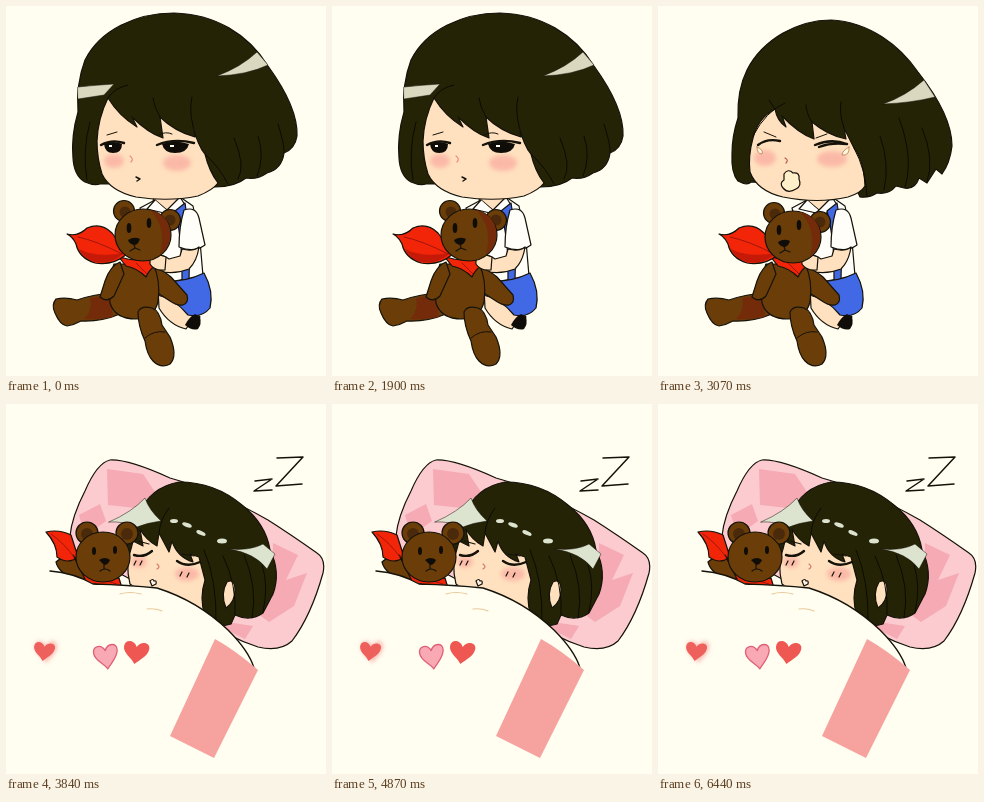
An HTML page for the animation above (6470 ms loop, 320x370 px).

```html
<!DOCTYPE html>
<html lang="en">
<head>
<meta charset="utf-8">
<title>Sleepy girl and teddy</title>
<style>
html, body { margin: 0; width: 100%; height: 100%; overflow: hidden; background: #fffef1; }
svg { display: block; width: 320px; height: 370px; }
g[id] { display: none; }
g[id].on { display: inline; }
#scene { stroke: #15120a; stroke-width: 1.2; stroke-linejoin: round; stroke-linecap: round; fill: none; }
.hair { fill: #252306; }
.strand { stroke: #0c0b02; stroke-width: 1; }
.skin { fill: #ffe1bf; }
.shine { fill: #dad8bf; stroke-width: .5; }
.pale { fill: #dce3cf; }
.blush { fill: #f9a99d; opacity: .7; stroke: none; }
.white { fill: #fffef8; }
.blue { fill: #4169e6; }
.bear { fill: #6b3e09; }
.dark { fill: #4b2a0b; stroke: none; }
.rust { fill: #742b0a; stroke: none; }
.red { fill: #f32508; }
.shade { fill: #c61a08; stroke: none; }
.fold { stroke: #9e160b; stroke-width: 1; }
.ink { fill: #100d08; stroke: none; }
.lid { stroke-width: 2.4; }
.tear { fill: #fff6dc; stroke: #b77c50; stroke-width: .8; }
.fill { stroke: none; }
</style>
</head>
<body>
<svg viewBox="0 0 320 370">
<defs>
  <path id="heartShape" d="M0 12C-3 6 -11 3 -11 -4C-11 -11 -3 -12 0 -5C3 -12 12 -11 11 -4C10 3 5 6 0 12Z"/>
  <filter id="soft" x="-50%" y="-50%" width="200%" height="200%"><feGaussianBlur stdDeviation="2"/></filter>
</defs>
<g id="scene" class="on">

  <g id="body">
    <!-- girl -->
    <path class="skin" d="M147 188L176 188L174 207L148 207Z"/>
    <path class="white" d="M134 202L149 194L162 205L174 191L187 200L194 235L197 270L168 275L150 262Z"/>
    <path class="white" d="M149 194L141 203L158 207L174 191L179 199L166 209"/>
    <path class="blue" d="M169 205L179 197Q185 230 183 274L176 274Q177 235 169 205Z"/>
    <path class="skin" d="M152 282L183 300L194 311Q184 316 180 323Q163 319 153 302Z"/>
    <path class="blue" d="M151 276Q178 277 198 267Q208 285 204 302Q196 312 182 309Q168 292 151 289Z"/>
    <path class="ink" d="M179 319Q183 311 189 308L194 311Q196 318 192 323Q186 325 179 319Z"/>
    <path class="white" d="M178 204Q190 200 193 212L199 239Q188 247 173 241Q173 221 178 204Z"/>
    <path class="skin" d="M176 243Q187 246 193 241Q191 255 183 263Q168 269 152 265L144 258L148 249Q157 248 163 253L174 250Z"/>
    <!-- bear -->
    <path class="bear" d="M149 262Q157 264 165 271L181 289Q183 297 177 299Q171 300 164 295L147 284Z"/>
    <path class="bear" d="M108 287Q88 288 71 294Q60 291 50 293Q45 299 49 307Q54 319 61 320Q68 319 75 315Q95 316 114 308Z"/>
    <path class="rust" d="M84 292L104 289L107 311Q92 314 78 313Q87 304 84 292Z"/>
    <path class="bear" d="M108 258Q101 274 104 297Q109 313 130 313Q148 312 152 296Q155 274 147 258Z"/>
    <path class="bear" d="M132 306Q135 299 146 302Q154 305 156 319L164 331Q172 350 164 358Q155 363 147 355Q141 349 139 335Q132 320 132 306Z"/>
    <path d="M139 332Q148 324 159 326" stroke-width="1"/>
    <path class="bear" d="M114 256Q104 260 99 275L94 291Q101 297 108 290L118 268Z"/>
    <path class="red" d="M112 250Q131 258 153 250L152 258Q144 262 140 271Q131 262 120 260Z"/>
    <path class="red" d="M61 228Q72 231 81 222Q95 216 106 227L121 248Q107 260 89 257Q73 252 70 238Q67 231 61 228Z"/>
    <path class="shade" d="M73 243Q90 252 118 247Q106 259 89 256Q77 252 73 243Z"/>
    <path class="fold" d="M72 231Q91 235 116 248M130 257L141 268"/>
    <path class="skin" d="M144 258Q143 249 151 248L160 251L159 264Q148 265 144 258Z"/>
    <g class="bearHead">
      <circle class="bear" cx="118" cy="205" r="10.5"/>
      <circle class="bear" cx="164" cy="214" r="10.5"/>
      <circle class="dark" cx="119" cy="206" r="5.5"/>
      <circle class="dark" cx="164" cy="214" r="5.5"/>
      <ellipse class="bear" cx="137" cy="229" rx="28" ry="26"/>
      <path class="rust" d="M144 204Q167 210 164 234Q161 244 154 248Q161 221 144 204Z"/>
      <ellipse class="ink" cx="123" cy="222" rx="2.3" ry="5"/>
      <ellipse class="ink" cx="143" cy="217" rx="2.3" ry="5"/>
      <path class="ink" d="M122 234Q128 230 134 233Q132 239 128 239Q123 238 122 234Z"/>
      <path d="M128 238L129 242L124 245M129 242L134 244"/>
    </g>
  </g>

  <g id="drowsy">
    <path class="hair" d="M94 178Q88 180 79 176Q68 170 67 152Q65 130 72 106Q70 78 79 54C94 24 130 7 168 7C209 8 242 28 262 60C278 82 292 108 291 130Q289 143 278 147Q276 163 261 167Q251 174 240 172Q229 181 209 181L196 178Z"/>
    <path class="skin" d="M102 92Q92 112 91 135Q91 152 96 168Q104 185 130 191Q163 196 192 190Q207 184 212 177Q203 165 199 148Q192 140 187 120L189 131Q168 125 154 111L157 132Q142 127 126 111L131 121Q113 110 102 92Z"/>
    <path class="shine" d="M72 81Q91 79 108 78L98 89L72 93Z"/>
    <path class="shine" d="M211 70Q235 61 251 46L262 59Q241 69 211 70Z"/>
    <path class="strand" d="M102 92Q108 82 122 79M154 111Q148 101 147 92M187 120Q183 104 186 91M199 148Q214 162 222 178M228 132Q240 160 232 173M252 130Q259 150 251 170M272 118Q279 140 278 147M84 116Q76 145 81 174"/>
    <path d="M101 129L111 126M152 129Q160 125 166 128" stroke-width="1"/>
    <ellipse class="blush" cx="108" cy="155" rx="10" ry="7" filter="url(#soft)"/>
    <ellipse class="blush" cx="171" cy="157" rx="14" ry="8" filter="url(#soft)"/>
    <path class="ink" d="M98 138Q108 134 116 138Q116 147 107 147Q99 147 98 138ZM156 138Q168 133 183 138Q181 147 169 147Q158 147 156 138Z"/>
    <path class="lid" d="M95 139Q106 133 118 137M151 139Q168 132 188 137"/>
    <path class="white fill" d="M103 139h3v2h-3ZM164 139h4v2h-4Z"/>
    <path d="M124 150Q128 153 125 156" stroke="#ef8878"/>
    <path d="M130 171L134 173L131 175" stroke-width="1.4"/>
  </g>

  <g id="yawn">
    <path class="hair" d="M93 176Q89 180 80 175Q73 167 74 148Q74 130 80 112Q79 84 89 64C105 33 140 14 173 14C212 16 242 40 260 66C279 90 294 116 294 140Q292 157 284 168L278 163L269 177L261 172Q257 184 246 182L238 180Q231 189 219 187Q212 192 202 191L197 180Z"/>
    <path class="skin" d="M117 103Q100 112 95 132Q90 150 92 166Q99 185 125 191Q160 198 190 191Q203 187 207 180Q206 155 196 142L186 122L188 133Q169 129 154 116L156 133Q140 127 124 110L128 121Q119 115 117 103Z"/>
    <path class="strand" d="M117 103L111 94M95 130Q108 105 127 97M154 116Q148 107 148 99M186 122Q181 108 183 96M196 142Q208 164 209 190M222 130Q232 157 226 184M241 112Q256 152 247 181M264 122Q277 153 269 176"/>
  </g>
  <path id="heldShine" class="shine" d="M225 98Q248 90 266 74L277 91Q253 97 225 98Z"/>
  <path id="wideShine" class="shine" d="M84 89Q95 89 109 86L95 97L82 97ZM238 83Q253 77 262 65L267 77Q256 82 238 83Z"/>

  <g id="yawnFace">
    <ellipse class="blush" cx="107" cy="152" rx="11" ry="8" filter="url(#soft)"/>
    <ellipse class="blush" cx="174" cy="153" rx="15" ry="8" filter="url(#soft)"/>
    <path d="M106 126L118 131M158 132L169 128" stroke-width="1"/>
    <path class="lid" d="M100 139Q109 132 122 135M157 139Q173 132 189 138M161 141Q174 136 189 138"/>
    <path class="tear" d="M99 141Q106 144 104 148Q99 148 99 141ZM191 141Q192 150 184 149Q184 145 191 141Z"/>
    <path d="M127 152Q131 154 128 157" stroke="#b55f4c"/>
    <path d="M126 168Q130 162 135 167Q142 166 141 173Q144 180 138 183Q130 188 125 182Q121 177 126 174Z" fill="#fff0ca"/>
  </g>

  <g id="sleep">
    <path d="M64 132Q66 112 79 87Q91 59 104 56Q122 55 164 74Q211 87 262 116Q284 130 311 149Q320 155 317 169Q305 212 286 237Q274 248 252 243Q221 233 195 213L68 145Z" fill="#fbcbd0"/>
    <path class="fill" fill="#f6aab3" d="M101 65L137 70L149 88L130 104L102 101ZM73 111L94 100L100 117L79 132ZM267 139L292 151L280 176L301 169L288 202L263 218L248 207L266 195ZM221 218L247 222L239 235L213 222Z"/>
    <path class="hair" d="M123 151Q117 133 132 111Q144 83 173 78Q209 78 236 101Q260 120 264 146Q275 168 267 190L257 209Q244 218 229 211L225 220Q206 226 194 210L184 192Z"/>
    <path class="skin" d="M125 145Q119 160 124 180Q142 194 170 195Q185 202 199 211Q193 195 199 176L193 153L184 150L187 158Q171 153 166 137L163 148L153 129L151 142Q140 136 134 125L137 142L127 137Z"/>
    <path class="skin" d="M221 178Q229 174 229 186Q229 198 220 204Q214 190 221 178Z"/>
    <path class="strand" d="M153 129Q154 116 163 104M198 146Q211 176 210 220M217 152Q231 181 229 211M238 151Q252 184 246 214M256 161Q263 181 257 208"/>
    <path class="shine pale" d="M103 118Q126 108 139 94Q143 106 155 117Q140 119 131 123Q117 117 103 118Z"/>
    <path class="shine pale" d="M223 145Q244 147 257 140L269 150L261 165Q249 149 223 145Z"/>
    <g class="pale fill">
      <ellipse cx="168" cy="117" rx="4" ry="2"/>
      <ellipse cx="181" cy="121" rx="5" ry="2" transform="rotate(20 181 121)"/>
      <ellipse cx="195" cy="129" rx="5" ry="2" transform="rotate(25 195 129)"/>
      <ellipse cx="216" cy="137" rx="5" ry="2.5"/>
    </g>
    <ellipse class="blush" cx="133" cy="158" rx="8" ry="6" filter="url(#soft)"/>
    <ellipse class="blush" cx="181" cy="170" rx="12" ry="7" filter="url(#soft)"/>
    <path class="lid" d="M128 151Q138 154 146 147M171 157Q181 164 194 158"/>
    <path d="M132 137L143 140M176 150L188 152M130 157l-2 4M136 157l-2 4M176 168l-2 4M183 169l-2 4"/>
    <path d="M151 160Q155 163 151 165" stroke="#d77966"/>
    <path d="M144 177Q147 174 148 177Q151 176 150 180L146 182Z" fill="#fff3e5"/>
    <!-- teddy -->
    <path class="bear" d="M50 158Q57 151 72 154L85 169L75 177Q53 171 50 158Z"/>
    <path class="red" d="M40 128Q53 125 65 131L72 153Q62 161 51 153Q51 140 40 128Z"/>
    <path class="red" d="M67 151L81 169Q97 177 113 174L116 184L81 179Z"/>
    <path class="fold" d="M45 130Q58 139 68 153M84 172L111 180"/>
    <circle class="bear" cx="81" cy="129" r="11"/>
    <circle class="bear" cx="121" cy="129" r="11"/>
    <circle class="dark" cx="81" cy="130" r="6"/>
    <circle class="dark" cx="121" cy="130" r="6"/>
    <ellipse class="bear" cx="97" cy="153" rx="27" ry="25"/>
    <ellipse class="ink" cx="88" cy="147" rx="2" ry="4"/>
    <ellipse class="ink" cx="109" cy="146" rx="2" ry="4"/>
    <path class="ink" d="M93 156Q99 152 104 156Q102 161 98 161Z"/>
    <path d="M98 161v4M94 167Q99 163 104 167"/>
    <!-- blanket -->
    <path class="fill" fill="#fffef1" d="M26 168L45 167Q70 170 90 181Q124 180 153 184Q192 197 224 228Q242 246 249 264L205 354L26 354Z"/>
    <path d="M44 167Q68 169 87 180Q122 181 151 184Q192 197 222 226Q243 247 248 264" stroke-width="1.4"/>
    <path d="M114 190Q124 187 135 190M141 205Q149 204 156 207" stroke="#e9c99b"/>
    <path class="fill" d="M209 235Q229 246 252 266L208 354L164 332Z" fill="#f6a29f"/>
    <use href="#heartShape" class="fill" fill="#f9bab2" transform="translate(40 247)" filter="url(#soft)"/>
    <use href="#heartShape" class="fill" fill="#ed605b" transform="translate(38 247) rotate(8) scale(.95 .85)"/>
    <use href="#heartShape" fill="#f8a9b3" stroke="#df6075" transform="translate(100 252) rotate(-8) scale(1.08)"/>
    <use href="#heartShape" class="fill" fill="#ef5752" transform="translate(130 248) rotate(8) scale(1.15 1.02)"/>
    <path d="M271 54L297 53L270 82L296 80M249 77L266 75L248 87L266 86" stroke-width="1.5"/>
  </g>
</g>
</svg>
<style>
path[id$="Shine"] { display: none; }
path[id$="Shine"].on { display: inline; }
</style>
<script>
const LOOP = 6470, BREATH = 520;
const poses = {
  drowsy: ["body", "drowsy"],
  yawn: ["body", "yawn", "heldShine", "yawnFace"],
  bigYawn: ["body", "yawn", "wideShine", "yawnFace"],
  sleep: ["sleep"]
};
const timeline = [
  [0, "drowsy"], [400, "yawn"], [700, "bigYawn"], [1030, "yawn"], [1330, "drowsy"],
  [2330, "yawn"], [2740, "bigYawn"], [3000, "yawn"], [3170, "sleep"]
];
const layers = [...document.querySelectorAll("#scene > [id]")];
const bearHead = document.querySelector(".bearHead");
const yawnFace = document.getElementById("yawnFace");
const sleeper = document.getElementById("sleep");
const move = (el, x, y) => el.setAttribute("transform", `translate(${x} ${y})`);

function draw(now) {
  const t = now % LOOP;
  const pose = timeline.findLast(([start]) => start <= t)[1];
  for (const layer of layers) layer.classList.toggle("on", poses[pose].includes(layer.id));
  if (pose === "drowsy") move(bearHead, 0, 0);
  else move(bearHead, -2, 2);
  if (pose === "bigYawn") move(yawnFace, 2, -1);
  else move(yawnFace, 0, 0);
  // slight rise with every breath
  const rise = Math.cos((t - 3840) / BREATH * 2 * Math.PI) < 0 ? -1 : 0;
  move(sleeper, 0, rise);
  requestAnimationFrame(draw);
}
draw(0);
</script>
</body>
</html>
```
